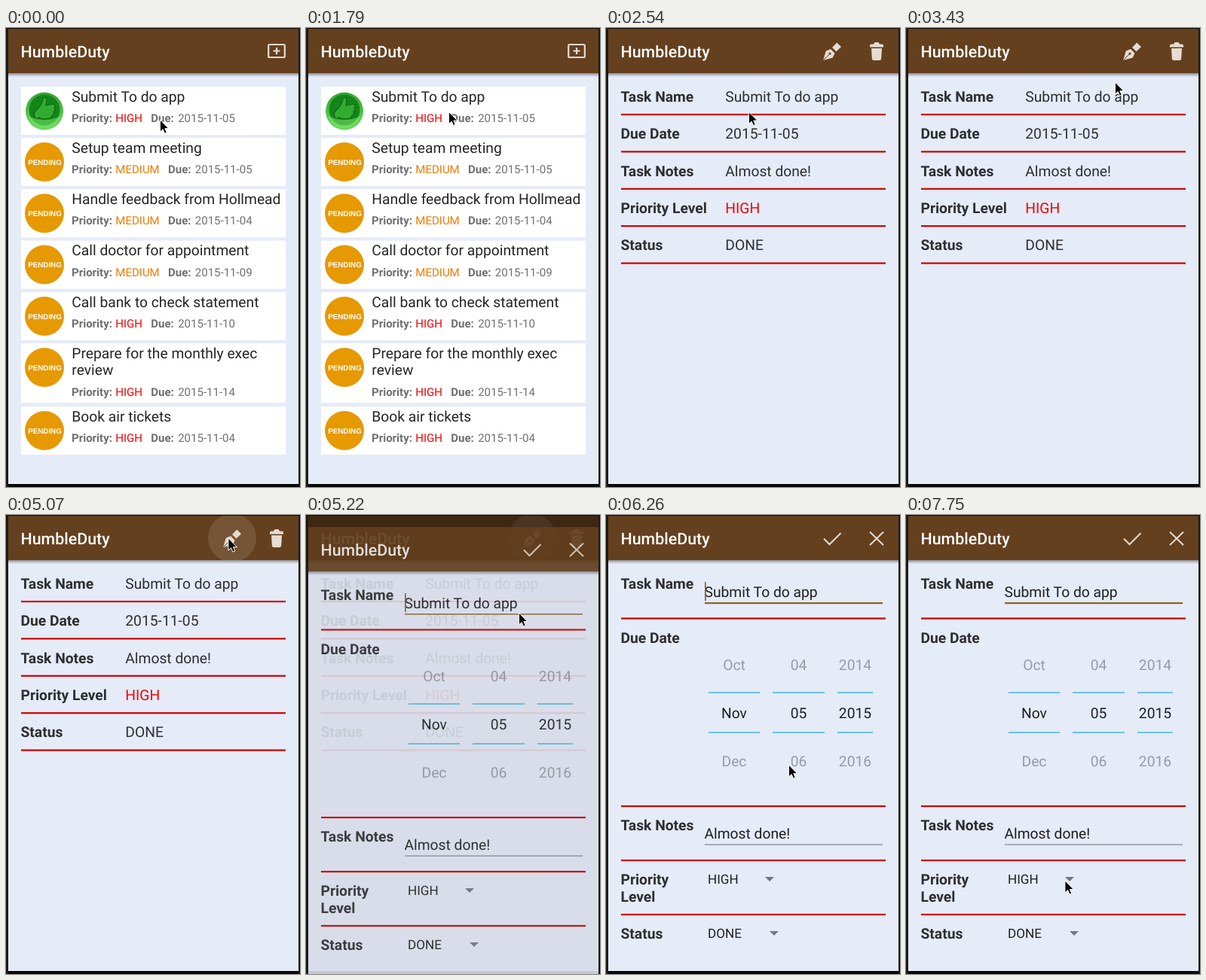
An HTML page that plays this animation: 390 by 610 pixels, repeating every 8000 ms.

```html
<!DOCTYPE html>
<html lang="en">
<head>
<meta charset="utf-8">
<title>To-do app</title>
<style>
  html, body { margin: 0; width: 100%; height: 100%; overflow: hidden; background: #000; }
  svg { display: block; }
  text { font-family: Roboto, sans-serif; white-space: pre; text-rendering: geometricPrecision; }
</style>
</head>
<body>
<svg id="stage" width="390" height="610" viewBox="0 0 390 610"></svg>
<script>
const INK = '#2e2e31', RED = '#cc0000', HIGH = '#f40000', MEDIUM = '#ee7b00', PALE = '#e6dcd3', BAR = '#65401e';

const rect = (x, y, w, h, fill, extra = '') =>
  `<rect x="${x}" y="${y}" width="${w}" height="${h}" fill="${fill}" ${extra}/>`;
const circle = (x, y, r, fill, extra = '') => `<circle cx="${x}" cy="${y}" r="${r}" fill="${fill}" ${extra}/>`;
const path = (d, fill, extra = '') => `<path d="${d}" fill="${fill}" ${extra}/>`;
const line = (d, color, width) => path(d, 'none', `stroke="${color}" stroke-width="${width}"`);
const text = (x, y, s, size = 19.26, fill = INK, extra = '') =>
  `<text x="${x}" y="${y}" font-size="${size}" fill="${fill}" ${extra}>${s}</text>`;
const bold = (x, y, s) => text(x, y, s, 19.26, INK, 'font-weight="700"');
const divider = y => rect(20, y - 1.1, 351, 2.2, RED);

const icons = {
  add: rect(348.2, 22, 21.6, 17, 'none', `rx="1.5" stroke="${PALE}" stroke-width="2.2"`) +
    line('M359 26v9M354.5 30.5h9', PALE, 2.2),
  pen: path('M288 43l3.800-12.500 6.200-2.500 5.500 5.500-2.800 6z M300 26l6.200-6.500 5.800 5.500-6.500 6.300z', PALE) +
    line('M288.5 42.500l8-8', BAR, 1) + circle(297, 34, 1.6, BAR),
  trash: path('M350 25.500v-2q0-2 2-2h3l1.500-2.500h5l1.500 2.500h3q2 0 2 2v2z M352 27h14l-.8 13.500q-.2 2.500-2.500 2.500h-7.400q-2.300 0-2.500-2.500z', PALE),
  check: line('M289 31.500l7.500 7.500 15-15', PALE, 2),
  close: line('M350 22.500l18 17.500M368 22.500l-18 17.500', PALE, 2)
};

// One app screen: background, content, then the bar with its shadow.
const screen = (id, content, actions, ripple = '') => `<g id="${id}">
  ${rect(3, 1, 385, 605, '#e5ebf7')}${content}
  ${rect(3, 60, 385, 5, 'url(#shade)')}${rect(3, 1, 385, 59, BAR)}${ripple}
  ${text(19.5, 39, 'HumbleDuty', 21.4, '#fff', 'font-weight="500"')}
  ${actions.map(a => icons[a]).join('')}</g>`;

const doneBadge = circle(51, 110.5, 25, 'url(#green)') + circle(51, 109, 20.5, '#14851a') +
  path('M37 113l6-7c4-3 5-6 6-12 1-3 5-2 5 2l-1 7 9-2c4 0 4 4 2 5 2 2 1 5-1 5 1 3 0 5-2 5 0 3-2 4-4 4-7 2-10 1-13-1l-5 2z',
    '#31ac30', 'stroke="#0b6810" stroke-width="1.2"') +
  path('M29 117q22 10 44 0q-6 16-22 16t-22-16z', '#7be56b', 'opacity=".55"');

const pendingBadge = cy => circle(51, cy, 26, '#e69900') +
  text(51.5, cy + 3.8, 'PENDING', 9.8, '#fff',
    `text-anchor="middle" font-weight="700" style="font-family:'Liberation Sans',Arial,sans-serif"`);

function card([top, lines, level, date], i) {
  const names = lines.split('|');
  const extra = (names.length - 1) * 22.5;
  const meta = `<tspan font-weight="700">Priority:</tspan> ` +
    `<tspan dx=".7" fill="${level === 'HIGH' ? HIGH : MEDIUM}">${level}</tspan>` +
    `<tspan font-weight="700" dx="11.3">Due:</tspan><tspan dx="5.3">${date}</tspan>`;
  return rect(20, top, 351, extra ? 79 : 64, '#fff') +
    (i ? pendingBadge(top + 32) : doneBadge) +
    names.map((s, k) => text(87.3, top + 19.8 + k * 22.5, s, 19.26, '#252525')).join('') +
    text(87, top + 47 + extra, meta, 15, '#707070');
}

const tasks = [
  [78, 'Submit To do app', 'HIGH', '2015-11-05'],
  [146, 'Setup team meeting', 'MEDIUM', '2015-11-05'],
  [214.3, 'Handle feedback from Hollmead', 'MEDIUM', '2015-11-04'],
  [282.6, 'Call doctor for appointment', 'MEDIUM', '2015-11-09'],
  [351, 'Call bank to check statement', 'HIGH', '2015-11-10'],
  [419, 'Prepare for the monthly exec|review', 'HIGH', '2015-11-14'],
  [503, 'Book air tickets', 'HIGH', '2015-11-04']
];

const details = [
  ['Task Name', 'Submit To do app'], ['Due Date', '2015-11-05'], ['Task Notes', 'Almost done!'],
  ['Priority Level', 'HIGH'], ['Status', 'DONE']
].map(([label, value], i) => {
  const y = 97.8 + i * 49.4;
  return bold(19.5, y, label) + text(158.3, y, value, 19.26, value === 'HIGH' ? HIGH : INK) + divider(y + 17.2);
}).join('');

const wheel = (x, left, right, values) =>
  values.map((s, i) => text(x, 205.8 + i * 64, s, 19.26, i === 1 ? '#1f1f22' : '#979ba4', 'text-anchor="middle"')).join('') +
  rect(left, 235.2, right - left, 1.8, '#5ebde6') + rect(left, 288.2, right - left, 1.8, '#5ebde6');

const spinner = (y, value, x) => text(135, y, value, 17.1, '#1f1f22') +
  path(`M${x} ${y - 9}h12l-6 6z`, '#737780');

const editor =
  bold(19.5, 97.8, 'Task Name') + text(130.5, 108.6, 'Submit To do app', 19.26, '#1f1f22') +
  '<rect id="underline" x="131" y="116" width="236" fill="#8a6426"/>' +
  rect(131, 89, 1.7, 25, '#8a6426', 'id="caret"') +
  bold(19.5, 169.5, 'Due Date') +
  wheel(170, 136, 204, ['Oct', 'Nov', 'Dec']) +
  wheel(255.5, 221, 290, ['04', '05', '06']) +
  wheel(330.5, 307, 354, ['2014', '2015', '2016']) +
  bold(19.5, 419.4, 'Task Notes') + text(130.5, 430.2, 'Almost done!', 19.26, '#1f1f22') +
  rect(131, 437.5, 236, 1.1, '#777b84') +
  bold(19.5, 491.4, 'Priority') + bold(19.5, 513.8, 'Level') + spinner(490, 'HIGH', 211) +
  bold(19.5, 563, 'Status') + spinner(562, 'DONE', 217) +
  [137.5, 387, 459, 531].map(divider).join('');

const stage = document.getElementById('stage');
stage.innerHTML = `<defs>
  <linearGradient id="shade" x2="0" y2="1"><stop stop-opacity=".38"/><stop offset="1" stop-opacity="0"/></linearGradient>
  <linearGradient id="green" x2="0" y2="1"><stop stop-color="#2fa52f"/><stop offset="1" stop-color="#6bd95c"/></linearGradient>
  <clipPath id="view">${rect(3, 1, 385, 609, '#000')}</clipPath>
  <clipPath id="bar">${rect(3, 1, 385, 59, '#000')}</clipPath></defs>
  ${rect(0, 0, 390, 610, '#080808')}${rect(0, 0, 3, 610, '#1a1a1a')}${rect(388, 0, 2, 610, '#1a1a1a')}
  <g clip-path="url(#view)">` +
  screen('list', tasks.map(card).join(''), ['add']) +
  screen('detail', details, ['pen', 'trash'],
    circle(300, 30.5, 32, '#fff', 'id="ripple" opacity=".11" clip-path="url(#bar)"')) +
  screen('edit', editor, ['check', 'close']) +
  rect(3, 1, 385, 605, '#000', 'id="dim" opacity=".38"') + '</g>' +
  path('M-.6 0v16l3.700-3.400 2.400 5.500 2.700-1.200-2.400-5.300h5z', '#000', 'id="pointer" stroke="#fff" stroke-width="1"');

const el = {};
for (const id of ['list', 'detail', 'edit', 'dim', 'ripple', 'underline', 'caret', 'pointer'])
  el[id] = document.getElementById(id);
const show = (node, on) => node.setAttribute('display', on ? 'inline' : 'none');

// Pointer stops: time, x, y
const stops = [
  [0, 205, 122], [150, 212, 111.5], [1650, 201, 111.5], [1790, 190, 111.5],
  [2980, 201, 108], [3130, 232, 95], [3280, 264, 79], [3430, 278, 72],
  [3720, 280, 65], [3870, 286, 50], [4020, 292, 36], [4170, 295.5, 31],
  [5220, 283, 130], [5370, 253, 289], [5520, 247, 318], [5660, 244, 329], [5810, 243, 332],
  [7010, 240, 346], [7160, 231, 394], [7310, 221, 440], [7460, 214, 470], [7610, 212, 482], [7750, 211.5, 486]
];

// Entering screens: time, screen below, screen on top, drop, opacity
const views = [
  [0, null, 'list', 0, 1],
  [2390, 'list', 'detail', 8, .96], [2540, null, 'detail', 0, 1],
  [5220, 'detail', 'edit', 15, .85], [5370, 'detail', 'edit', 1.5, 1], [5520, null, 'edit', 0, 1]
];
const latest = (keys, t) => keys.filter(k => k[0] <= t).pop();

function draw(now) {
  const t = now % 8000;
  const [, below, top, drop, opacity] = latest(views, t);
  for (const id of ['list', 'detail', 'edit']) {
    show(el[id], id === below || id === top);
    el[id].setAttribute('transform', `translate(0 ${id === top ? drop : 0})`);
    el[id].setAttribute('opacity', id === top ? opacity : 1);
  }
  show(el.dim, below);
  if (below) el[top].before(el.dim);
  show(el.ripple, t >= 5070);
  show(el.caret, t < 5810 || Math.floor((t - 5810) / 450) % 2);
  el.underline.setAttribute('height', t < 5520 ? 1.5 : 2.2);
  const [, x, y] = latest(stops, t);
  el.pointer.setAttribute('transform', `translate(${x} ${y})`);
  requestAnimationFrame(() => draw(performance.now() - start));
}
const start = performance.now();
draw(0);
</script>
</body>
</html>
```
